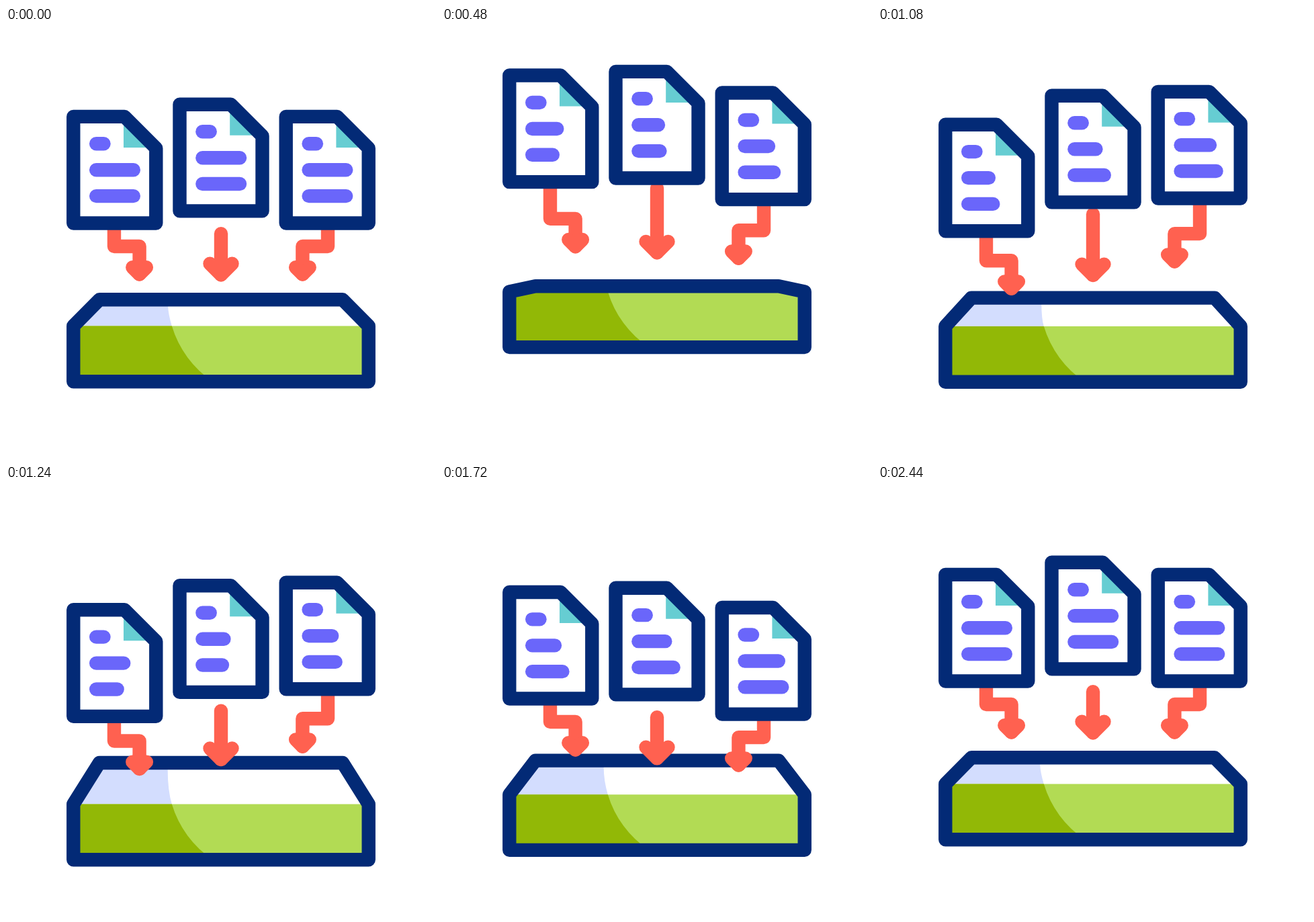
Recreate the animation shown at these times as an HTML page with a canvas. Size 640 px wide and 640 px high, loop 2640 ms.

```html
<!DOCTYPE html>
<html lang="en">
<head>
<meta charset="utf-8">
<title>Documents into storage</title>
<style>
  html, body { margin: 0; height: 100%; overflow: hidden; background: #fff; }
  canvas { display: block; }
</style>
</head>
<body>
<canvas id="stage" width="640" height="640"></canvas>
<script>
const ctx = document.getElementById('stage').getContext('2d');
const LOOP = 2640, STEP = 40;
const NAVY = '#032a76', RED = '#ff6150', PURPLE = '#6a66fa', TEAL = '#66cdd2';
const LIME = '#b2db54', OLIVE = '#92b806', LAVENDER = '#d3ddfe';

const smooth = p => p * p * (3 - 2 * p);

// Eases through [time, value] pairs and holds the end values.
function track(keys, t) {
  if (t <= keys[0][0]) return keys[0][1];
  for (let i = 1; i < keys.length; i++) {
    const [t0, v0] = keys[i - 1], [t1, v1] = keys[i];
    if (t < t1) return v0 + (v1 - v0) * smooth((t - t0) / (t1 - t0));
  }
  return keys[keys.length - 1][1];
}

// Shared bob: up, down, back to rest.
const bob = (t, up, down) => track([[0, 0], [680, up], [1360, down], [2000, 0]], t);

// Three shrink-and-grow cycles of a text bar.
function shrink(t) {
  if (t <= 0 || t >= 2160) return 0;
  const phase = t % 720 / 360;
  return smooth(phase < 1 ? phase : 2 - phase);
}

function trace(points, close) {
  ctx.beginPath();
  for (const [x, y] of points) ctx.lineTo(x, y);
  if (close) ctx.closePath();
}

function fillShape(points, color) {
  trace(points, true);
  ctx.fillStyle = color;
  ctx.fill();
}

function strokeLine(points, color, close = false) {
  trace(points, close);
  ctx.strokeStyle = color;
  ctx.stroke();
}

function drawTray(t) {
  const lift = bob(t, -64.5, 38.5);
  const top = 404.3 + bob(t, -25.3, 10.6);
  const surface = 443.5 + lift, bottom = 526.2 + lift;
  const left = 100.3, right = 539.7;
  const edgeX = 241.2 + bob(t, 8, -1.3), surfaceX = 246.8;
  const outline = [[left, surface], [139, top], [501, top], [right, surface], [right, bottom], [left, bottom]];

  // Shaded part of the empty space.
  ctx.beginPath();
  ctx.moveTo(left, surface);
  ctx.lineTo(139, top);
  ctx.lineTo(edgeX, top);
  ctx.lineTo(edgeX, Math.min(top + 10, surface));
  ctx.quadraticCurveTo(edgeX, Math.max(top + 10, surface - (surfaceX - edgeX) / 0.295), surfaceX, surface);
  ctx.fillStyle = LAVENDER;
  ctx.fill();

  // Liquid with its shaded side.
  fillShape([[left, surface], [right, surface], [right, bottom], [left, bottom]], LIME);
  const cx = 392.5, cy = 400 + lift, r = 152;
  ctx.beginPath();
  ctx.moveTo(left, bottom);
  ctx.lineTo(left, surface);
  ctx.arc(cx, cy, r, Math.PI - Math.asin((surface - cy) / r), Math.PI - Math.asin((bottom - cy) / r), true);
  ctx.fillStyle = OLIVE;
  ctx.fill();

  strokeLine(outline, NAVY, true);
}

function drawHead(x, y, size) {
  strokeLine([[x - size, y - size], [x, y], [x + size, y - size]], RED);
}

function drawMiddleArrow(t) {
  const tip = 367.2 + bob(t, -52, 64);
  strokeLine([[320, 306.3 + bob(t, -107, 64)], [320, tip]], RED);
  drawHead(320, tip, 16.5);
}

function drawSideArrow(t, docBottom, mirrored) {
  const dy = bob(t, -52, 64);
  const x = v => mirrored ? 640 - v : v;
  const bend = 325 + dy, tip = 366.5 + dy;
  strokeLine([[x(161), docBottom], [x(161), bend], [x(198.6), bend], [x(198.6), tip]], RED);
  drawHead(x(198.6), tip, 10.3);
}

function drawDocument(t, x, y, shrinkBy) {
  ctx.save();
  ctx.translate(x, y);
  const outline = [[0, 0], [76, 0], [123, 47], [123, 158.6], [0, 158.6]];
  fillShape(outline, '#fff');
  fillShape([[74.7, 0], [76, 0], [121, 46], [74.7, 46]], TEAL);
  strokeLine(outline, NAVY, true);
  const bar = (row, length) => strokeLine([[33.9, row], [33.9 + length, row]], PURPLE);
  bar(40.4, 11.3);
  bar(79.4, 55.6 - shrinkBy * shrink(t));
  bar(118.2, 55.6 - shrinkBy * shrink(t - 120));
  ctx.restore();
}

function draw(t) {
  ctx.fillStyle = '#fff';
  ctx.fillRect(0, 0, 640, 640);
  ctx.lineWidth = 20.4;
  ctx.lineCap = ctx.lineJoin = 'round';
  drawTray(t);
  [[131.9, 25], [113.8, 27], [131.9, 21]].forEach(([restY, shrinkBy], i) => {
    const local = t - i * 80;
    const y = restY + bob(local, -77.5, 64);
    if (i === 1) drawMiddleArrow(local);
    else drawSideArrow(local, y + 158.6, i === 2);
    drawDocument(local, 100.3 + i * 158.2, y, shrinkBy);
  });
}

function tick() {
  const t = performance.now() % LOOP;
  draw(Math.floor(t / STEP) * STEP);
  requestAnimationFrame(tick);
}
tick();
</script>
</body>
</html>
```
